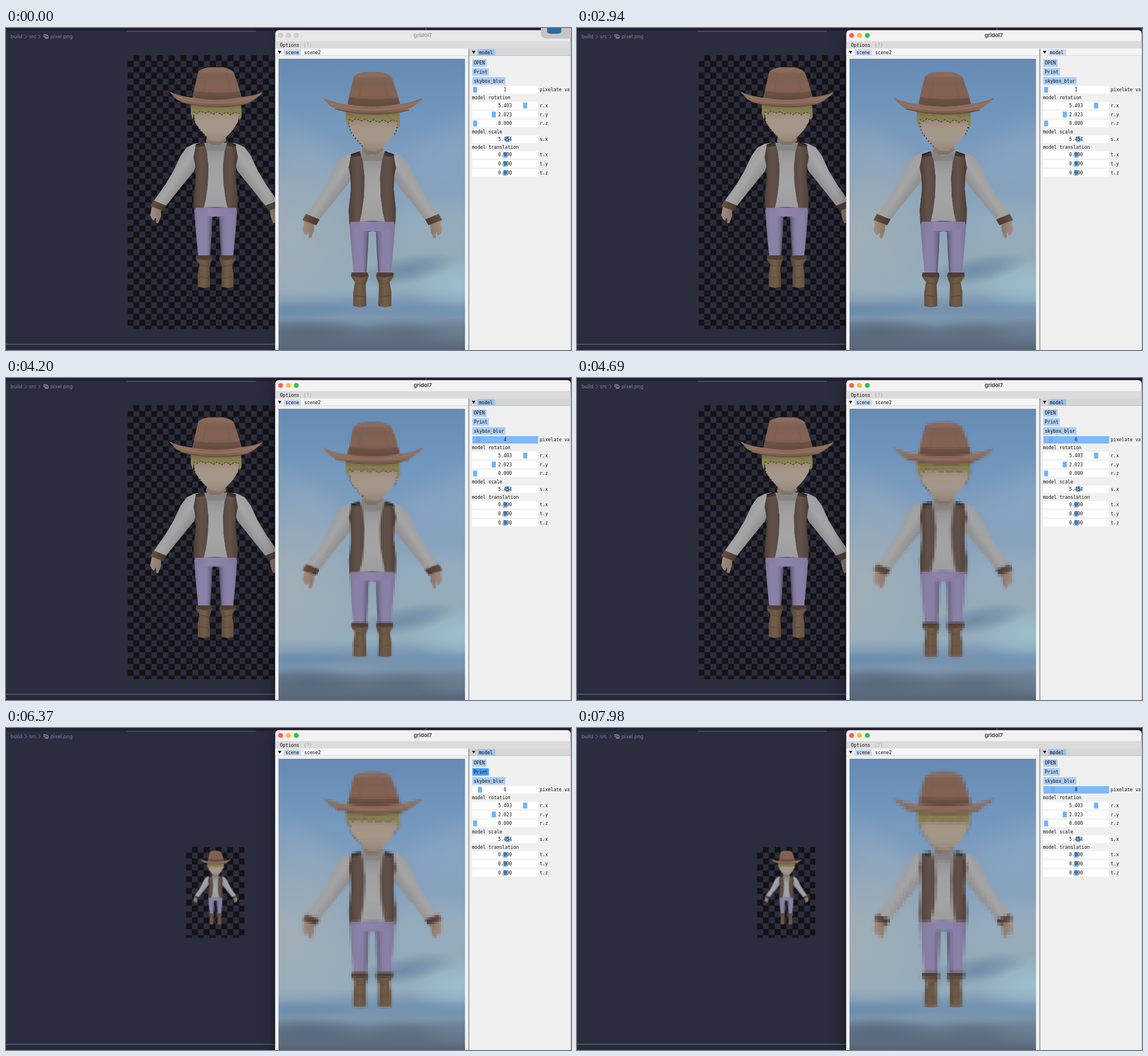
Recreate the animation shown at these times as an HTML page with a canvas. Size 991 px wide and 565 px high, loop 8 s.

```html
<!DOCTYPE html>
<html lang="en">
<head>
<meta charset="utf-8">
<title>Pixelate tool</title>
<style>
html, body { margin: 0; width: 100%; height: 100%; overflow: hidden; background: #2b2c3e; }
canvas, svg { position: absolute; left: 0; top: 0; width: 991px; height: 565px; display: block; }
.mono { font: 8.03px "DejaVu Sans Mono", monospace; fill: #111; white-space: pre; }
.crumb { font: 9px Inter, sans-serif; fill: #7483ad; }
.title { font: 700 9.4px Inter, sans-serif; text-anchor: middle; }
</style>
</head>
<body>
<canvas id="stage" width="991" height="565"></canvas>
<svg id="ui" viewBox="0 0 991 565"></svg>
<script>
const LOOP = 8000;
const VIEW = { x: 477.6, y: 54.3, w: 327.5, h: 512 };
const UNIT = 0.69; // screen pixels per device pixel
const RES = 2;
const ctx = document.getElementById('stage').getContext('2d');
const ui = document.getElementById('ui');

// Step tracks: [time, value]
const tracks = {
  value: [[0, 1], [3990, 3], [4200, 4], [4480, 5], [4620, 6], [7840, 7], [7980, 8]],
  slider: [[0, 0], [3360, 1], [3640, 2], [5040, 1], [5110, 0], [7000, 1], [7140, 0], [7630, 1], [7840, 2]],
  blur: [[0, 0], [5250, 1], [5530, 0], [6790, 1], [6930, 0]],
  print: [[0, 0], [5810, 1], [6020, 2], [6090, 1], [6720, 0]],
  focus: [[0, 0], [2940, 1]],
  panel: [[0, 1], [2940, 0], [3640, 1]],
  saved: [[0, 1], [6370, 6]]
};

function stepAt(track, t) {
  let v = track[0][1];
  for (const [time, value] of track) if (time <= t) v = value;
  return v;
}

function makeCanvas(w, h) {
  const c = document.createElement('canvas');
  c.width = Math.ceil(w);
  c.height = Math.ceil(h);
  return c;
}

// ---- Character ----
function drawFigure() {
  const c = makeCanvas(340 * RES, 524 * RES);
  const g = c.getContext('2d');
  g.scale(RES, RES);
  g.translate(-VIEW.x, -VIEW.y);

  const shade = (x0, y0, x1, y1, ...cols) => {
    const s = g.createLinearGradient(x0, y0, x1, y1);
    cols.forEach((col, i) => s.addColorStop(i / (cols.length - 1), col));
    return s;
  };
  const fill = (d, col) => { g.fillStyle = col; g.fill(new Path2D(d)); };
  const line = (d, col, w, dash = []) => {
    g.strokeStyle = col;
    g.lineWidth = w;
    g.setLineDash(dash);
    g.stroke(new Path2D(d));
  };
  const bothSides = draw => {
    draw();
    g.save();
    g.translate(1285, 0);
    g.scale(-1, 1);
    draw();
    g.restore();
  };

  // shirt, neck
  fill('M612 218L673 218L668 340L617 340Z', shade(0, 216, 0, 340, '#8a8a8c', '#a1a1a2', '#a5a5a6', '#9d9d9f'));
  fill('M624 218L642 224L662 218L662 233L624 233Z', '#868482');
  fill('M628 198L659 198L662 215L650 222L634 222L624 216Z', shade(0, 200, 0, 221, '#9d8c7e', '#7d7066'));

  bothSides(() => {
    // hand, arm, cuff
    fill('M523 338L541 343L540 356L535 369L531 368L531 358L527 364L523 361L520 354Z', shade(521, 350, 541, 352, '#a28d7e', '#88776c'));
    fill('M616 218L602 220L588 227L577 242L564 270L548 297L526 328L549 337L572 308L602 271L612 240Z', shade(560, 262, 592, 284, '#9c9d9f', '#a6a6a7', '#8d8d90'));
    fill('M526 326L550 336L544 346L520 337Z', shade(525, 330, 548, 340, '#684f43', '#49382f'));
    // leg
    fill('M602 340L643 338L643 356L636 358L635 388L632 433L610 433L606 392Z', shade(602, 0, 637, 0, '#7b7293', '#8b82a8', '#8880a5', '#625c75'));
    line('M635 360L633 398L631 431', '#5f596f', 2.2);
    // boot
    fill('M606 429L634 429L636 435L631 450L632 488L620 490L609 488L609 464L612 446L605 436Z', shade(608, 0, 634, 0, '#655040', '#735e4a', '#5a4638'));
    fill('M606 429L634 429L636 435L622 438L605 435Z', '#4e3d34');
    line('M613 447L629 450M611 469L630 472', '#594739', 1.2);
    // vest
    fill('M605 223L621 217L626 235L629 262L628 295L624 324L618 350L602 343L601 320L605 285L604 260L601 245Z', shade(602, 0, 630, 0, '#524139', '#63524a', '#564841'));
    fill('M605 221L621 216L622 224L605 227Z', '#40352f');
    line('M605 240L606 280L602 320', '#493b34', 1.6);
  });
  fill('M604 340L681 340L681 348L662 356L623 356L604 348Z', shade(604, 0, 681, 0, '#847a9e', '#8f85ab', '#8b81a8', '#847a9e'));
  line('M605 222L612 221L619 217M666 217L674 221L681 223', '#191817', 1.6, [4, 1]);

  // face, hair
  fill('M600 145L688 145L688 164L684 179L675 194L661 209L650 216L637 215L627 209L613 194L603 179Z',
    shade(0, 155, 0, 216, '#918273', '#a59687', '#a4978a', '#968677'));
  line('M600 160L604 182L615 196L628 211M688 162L685 179L681 188', '#211d19', 1.7, [2, 4]);
  fill('M596 143L690 142L691 170L687 177L686 164L678 161L670 166L662 161L654 166L645 161L638 165L630 160L623 163L614 159L607 164L602 160L600 176L596 164Z',
    shade(0, 143, 0, 168, '#67623f', '#868050', '#8b8457'));
  line('M601 160L607 164L614 159L623 163L630 160L638 165L645 161L654 166L662 161L670 166L678 161L686 164', '#45402a', 1.3, [4, 2]);
  line('M600 150L614 157M620 148L630 157M665 149L674 158', '#716b42', 1);

  // hat
  fill('M599 132L605 106L610 85Q620 77 634 77L655 77Q673 80 677 88L684 108L691 133L645 142Z',
    shade(0, 77, 0, 136, '#866759', '#7e6052', '#836354', '#75584b'));
  fill('M610 85Q620 77 634 77L655 77Q673 80 677 88L650 85L627 87Z', '#8a6a5b');
  line('M626 88L619 122M662 88L671 125', '#7c5d4f', 2);
  fill('M602 121Q645 128 688 122L692 136Q645 142 599 136Z', shade(0, 121, 0, 138, '#6f5347', '#64493f'));
  fill('M555 122Q576 132 602 134Q644 142 690 133Q712 131 731 123L726 129L714 138Q702 146 684 149Q645 155 600 148Q582 144 569 137Z',
    shade(0, 124, 0, 151, '#775b4f', '#90705f', '#8b6a5b', '#735649'));
  line('M558 124Q580 138 605 141Q645 148 685 140Q712 136 728 126', '#977565', 1.8);
  line('M577 142Q645 159 707 144', '#5e483e', 1.3);
  return c;
}

function pixelate(src, size) {
  const b = size * UNIT;
  const cols = Math.ceil(VIEW.w / b), rows = Math.ceil(VIEW.h / b);
  const out = makeCanvas(cols, rows);
  const g = out.getContext('2d');
  g.imageSmoothingQuality = 'medium';
  g.drawImage(src, 0, 0, cols * b * RES, rows * b * RES, 0, 0, cols, rows);
  return { img: out, w: cols * b, h: rows * b };
}

// ---- Sky ----
function drawSky() {
  const c = makeCanvas(VIEW.w, VIEW.h);
  const g = c.getContext('2d');
  g.translate(-VIEW.x, -VIEW.y);
  const base = g.createLinearGradient(0, 54, 0, 566);
  [[0, '#668bb4'], [.19, '#7397bc'], [.38, '#82a0be'], [.54, '#8ca6bc'], [.68, '#94aab8'],
   [.79, '#94acbc'], [.85, '#7492b1'], [.89, '#7a94ab'], [.94, '#65768a'], [1, '#576578']]
    .forEach(([p, col]) => base.addColorStop(p, col));
  g.fillStyle = base;
  g.fillRect(477, 54, 330, 514);
  const blob = (x, y, rx, ry, rgb, a, tilt = 0) => {
    g.save();
    g.translate(x, y);
    g.rotate(tilt);
    g.scale(rx, ry);
    const s = g.createRadialGradient(0, 0, 0, 0, 0, 1);
    s.addColorStop(0, `rgba(${rgb},${a})`);
    s.addColorStop(.5, `rgba(${rgb},${a * .6})`);
    s.addColorStop(1, `rgba(${rgb},0)`);
    g.fillStyle = s;
    g.fillRect(-1, -1, 2, 2);
    g.restore();
  };
  blob(500, 350, 150, 160, '164,176,182', .8);
  blob(530, 225, 130, 55, '150,171,192', .5, .6);
  blob(785, 215, 110, 70, '150,174,200', .4, -.3);
  blob(760, 350, 110, 60, '158,178,192', .55);
  blob(715, 150, 90, 60, '107,149,195', .4);
  blob(795, 450, 95, 50, '157,193,206', .85);
  blob(700, 425, 95, 25, '100,130,158', .75, -.2);
  blob(620, 452, 130, 24, '150,174,190', .4);
  blob(500, 495, 130, 16, '98,134,172', .55);
  blob(780, 495, 110, 16, '110,149,181', .5);
  blob(600, 510, 80, 14, '130,155,176', .5);
  blob(530, 532, 110, 25, '82,96,116', .6);
  blob(700, 534, 80, 20, '88,102,120', .5);
  blob(795, 535, 80, 25, '108,128,148', .6);
  return c;
}

const figure = drawFigure();
const sky = drawSky();

function place(size, x, y, scale) {
  const p = size === 1
    ? { img: figure, w: figure.width / RES, h: figure.height / RES }
    : pixelate(figure, size);
  ctx.imageSmoothingEnabled = size === 1 || scale < 1;
  ctx.drawImage(p.img, x, y, p.w * scale, p.h * scale);
}

function rect(x, y, w, h, col) {
  ctx.fillStyle = col;
  ctx.fillRect(x, y, w, h);
}

function drawSaved(size) {
  const small = size > 1;
  const [x, y, w, h] = small ? [315.8, 208.5, 102.2, 159.7] : [213.2, 47.6, 307, 481];
  const cell = 10.32;
  ctx.save();
  ctx.beginPath();
  ctx.rect(x, y, w, h);
  ctx.clip();
  for (let r = 0; r * cell < h; r++)
    for (let k = (r + 1) % 2; k * cell < w; k += 2)
      rect(x + k * cell, y + r * cell, cell, cell, '#131314');
  place(size, x, y, small ? .3125 : .9375);
  ctx.restore();
}

function drawStage(s) {
  rect(0, 0, 991, 565, '#2b2c3e');
  rect(0, 0, 991, 5, '#222232');
  rect(438, 0, 553, 5, '#241c30');
  rect(736, 0, 1, 4, '#77778a');
  rect(212, 5, 226, 1.5, '#555663');
  rect(0, 554.5, 472, 1, '#77788a');
  rect(0, 556, 472, 9, '#28293a');
  drawSaved(s.saved);

  ctx.save();
  ctx.shadowColor = s.focus ? 'rgba(0,0,0,.5)' : 'rgba(0,0,0,.3)';
  ctx.shadowBlur = s.focus ? 26 : 12;
  ctx.shadowOffsetY = s.focus ? 8 : 3;
  ctx.fillStyle = s.focus ? '#f4f1f4' : '#e9e7e9';
  ctx.beginPath();
  ctx.roundRect(472.3, 3.7, 518.2, 580, 6);
  ctx.fill();
  ctx.restore();
  rect(472.3, 23, 518.2, 13, '#dbdbdb');
  rect(472.3, 36, 518.2, 529, '#f0f0f0');
  rect(472.3, 36, 339, 12, '#f6f6f6');
  rect(472.3, 47.8, 339, 1, '#cbdcee');
  rect(813, 36, 177.5, 12, s.panel ? '#d5d6d8' : '#f5f5f5');
  rect(813, 47.8, 177.5, 1, s.panel ? '#9fc4ea' : '#cbdcee');
  rect(811, 36, 1.6, 529, '#8f8f92');
  ctx.drawImage(sky, VIEW.x, VIEW.y, VIEW.w, VIEW.h);
  place(s.value, VIEW.x, VIEW.y, 1);
}

// ---- Interface ----
function add(tag, attrs, text) {
  const el = document.createElementNS(ui.namespaceURI, tag);
  set(el, attrs);
  if (text !== undefined) el.textContent = text;
  ui.appendChild(el);
  return el;
}
function set(el, attrs) {
  for (const k in attrs) el.setAttribute(k, attrs[k]);
}
const box = (x, y, width, height, fill) => add('rect', { x, y, width, height, fill });
const mono = (x, mid, text, attrs = {}) => add('text', { class: 'mono', x, y: mid + 2.8, ...attrs }, text);
const triangle = x => add('path', { d: `M${x} 40h6l-3 5.2z`, fill: '#111' });

function crumb(x, text) { add('text', { class: 'crumb', x, y: 18 }, text); }
crumb(8, 'build');
crumb(40, 'src');
crumb(78, 'pixel.png');
for (const x of [33, 57]) add('path', { d: `M${x} 11.5l3 3.5l-3 3.5`, fill: 'none', stroke: '#7483ad' });
add('path', { d: 'M66.5 16v-4.5h6M68.5 13.5h5.5v4.5h-5.5z', fill: 'none', stroke: '#a99fb9' });
add('path', { d: 'M69 18l2-2.5l3 2.5z', fill: '#a99fb9' });

const lights = [481.6, 495.4, 509.2].map(cx => add('circle', { cx, cy: 13, r: 4, 'stroke-width': .6 }));
const lightColors = ['#fe5f57', '#febc2e', '#28c840'];
const title = add('text', { class: 'title', x: 731, y: 16.3 }, 'gridol7');
mono(480.5, 29.7, 'Options');
mono(522, 29.7, '(?)', { style: 'fill:#a5a5a5' });
triangle(477);
box(487, 37.3, 30, 10.7, '#c9daee');
mono(490, 42.7, 'scene');
mono(523, 42.7, 'scene2');
triangle(817.3);
const tab = box(827, 37.3, 31, 10.7);
mono(829.5, 42.7, 'model');

function button(y, w, text) {
  const el = box(818, y, w, 13, '#abcdf5');
  mono(820.5, y + 6.5, text);
  return el;
}
button(54.8, 25, 'OPEN');
const printButton = button(70.5, 29, 'Print');
const blurButton = button(86.2, 58, 'skybox_blur');

add('clipPath', { id: 'edge' }).innerHTML = '<rect width="988.5" height="565"/>';
function slider(y, grabX, value, label) {
  const frame = box(818, y, 115.3, 13, '#fff');
  const grab = box(grabX, y + 1.4, 7.2, 10.2, '#70b2fb');
  const text = mono(875.3, y + 6.5, value, { 'text-anchor': 'middle' });
  mono(936, y + 6.5, label, { 'clip-path': 'url(#edge)' });
  return { frame, grab, text };
}
const pixelSlider = slider(102, 819.2, '1', 'pixelate value');
mono(817.3, 122.5, 'model rotation');
slider(129.6, 907, '5.403', 'r.x');
slider(145.3, 852, '2.023', 'r.y');
slider(161, 819.2, '0.000', 'r.z');
mono(817.3, 181.7, 'model scale');
slider(188.6, 876, '5.454', 's.x');
mono(817.3, 209.2, 'model translation');
['t.x', 't.y', 't.z'].forEach((name, i) => slider(216.1 + i * 15.8, 872, '0.000', name));

const switcher = add('g', {});
switcher.append(
  add('rect', { x: 938, y: -20, width: 80, height: 38.5, rx: 9, fill: '#c5c4c8' }),
  add('rect', { x: 949, y: -15, width: 25, height: 25, rx: 5, fill: '#2d6b98' })
);

const buttonColors = ['#abcdf5', '#459bfa', '#1088fa'];
const frameColors = ['#ffffff', '#aaccf4', '#7fb8fb'];

function drawUi(s) {
  lights.forEach((el, i) => set(el, {
    fill: s.focus ? lightColors[i] : '#d2d0d2',
    stroke: s.focus ? lightColors[i] : '#bcbabc'
  }));
  title.style.fill = s.focus ? '#464446' : '#a5a3a5';
  set(tab, { fill: s.panel ? '#9dc0e4' : '#c9daee' });
  set(printButton, { fill: buttonColors[s.print] });
  set(blurButton, { fill: buttonColors[s.blur] });
  set(pixelSlider.frame, { fill: frameColors[s.slider] });
  set(pixelSlider.grab, { x: 819.2 + (s.value - 1) * 1.68, fill: s.slider === 2 ? '#78aaea' : '#70b2fb' });
  pixelSlider.text.textContent = s.value;
  set(switcher, { opacity: s.icon });
}

let lastKey = '';
function render(t) {
  const s = {};
  for (const name in tracks) s[name] = stepAt(tracks[name], t);
  s.icon = Math.max(0, 1 - Math.floor(t / 70) / 5);
  const key = JSON.stringify(s);
  if (key !== lastKey) {
    drawStage(s);
    drawUi(s);
    lastKey = key;
  }
}

const start = performance.now();
function tick() {
  render((performance.now() - start) % LOOP);
  requestAnimationFrame(tick);
}
tick();
</script>
</body>
</html>
```
